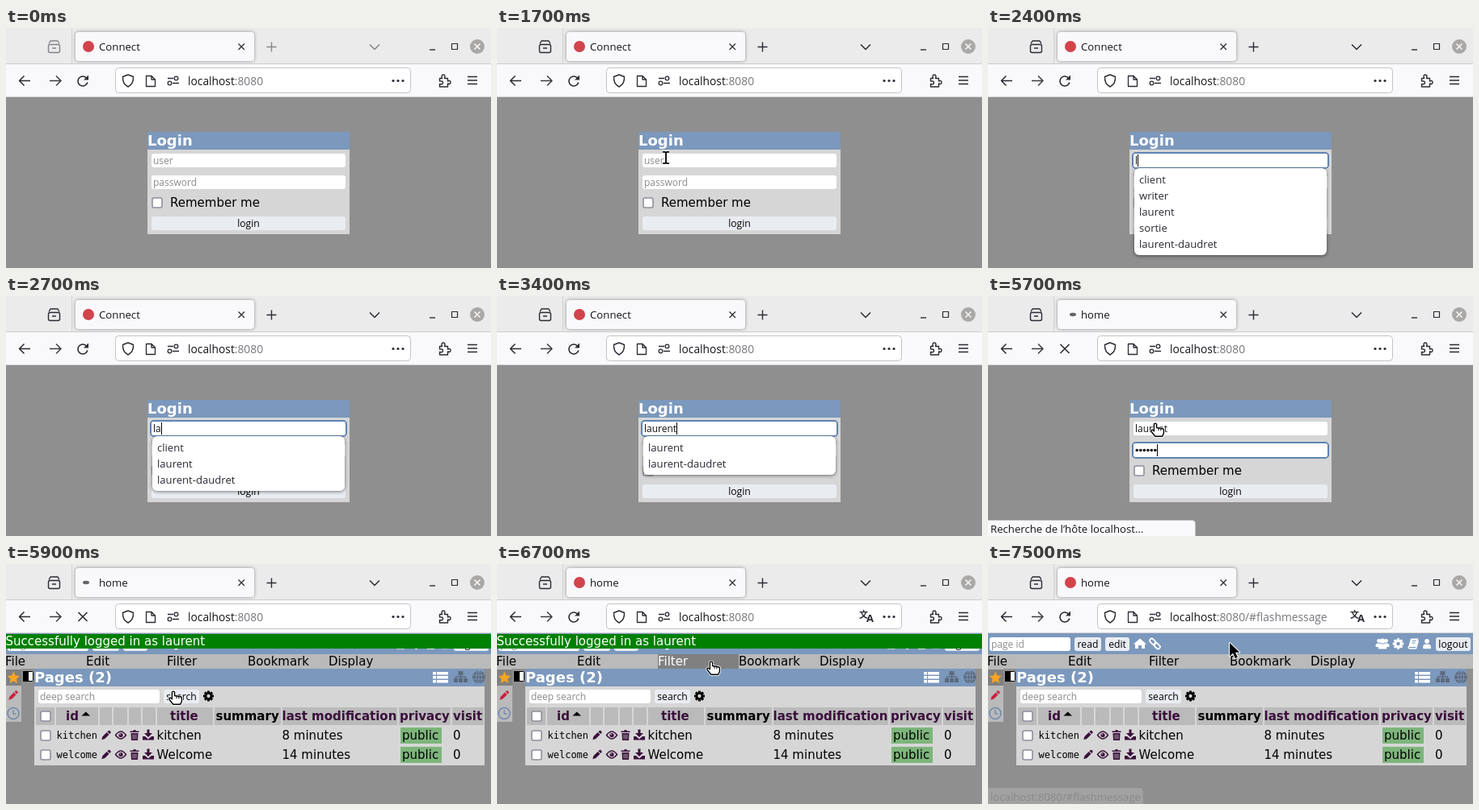
Animation, 600 px wide and 298 px high, one loop 8 s. Source, as an HTML page with a canvas:

```html
<!DOCTYPE html>
<html lang="en">
<head>
<meta charset="utf-8">
<title>Login demo</title>
<style>
html, body { margin: 0; width: 100%; height: 100%; overflow: hidden; }
canvas { display: block; width: 600px; height: 298px; }
</style>
</head>
<body>
<canvas id="stage" width="600" height="298"></canvas>
<script>
const g = document.getElementById('stage').getContext('2d');
const LOOP = 8000, STEP = 100, TAU = Math.PI * 2;
const UI = '"Open Sans", sans-serif', PAGE = '"DejaVu Sans", sans-serif', MONO = '"DejaVu Sans Mono", monospace';
const INK = '#2b2a33', GREY = '#8f8f8f', PANEL = '#d6d6d6', BAR = '#bababa', BLUE = '#7b98bd',
  BUTTON = '#e9edf2', PLUM = '#3a0f3b', HINT = '#8b8b8b';
const USER = 'laurent';
const ACCOUNTS = ['client', 'writer', USER, 'sortie', USER + '-daudret'];

// [time, x, y, shape]; a shape of '' hides the pointer
const POINTER = [
  [0, 0, 0, ''], [600, 116, 14, 'arrow'], [700, 121, 22, 'arrow'], [800, 134, 47, 'arrow'],
  [900, 155, 84, 'arrow'], [1000, 178, 120, 'arrow'], [1100, 196, 148, 'arrow'],
  [1200, 206, 159, 'beam'], [1500, 209, 161, 'beam'], [2400, 0, 0, ''],
  [5600, 207, 158, 'hand'], [6500, 222, 150, 'arrow'], [6600, 248, 137, 'arrow'],
  [6700, 265, 121, 'hand'], [6800, 285, 100, 'hand'], [6900, 297, 68, 'beam'],
  [7000, 299, 84, 'arrow'], [7100, 299, 98, 'hand'], [7300, 299, 98, 'arrow']
];
const USER_KEYS = [2400, 2600, 2900, 3000, 3100, 3200, 3400];
const DOT_KEYS = [4500, 4700, 4800, 4900, 5100, 5100];

const countUntil = (times, t) => times.filter(k => k <= t).length;

function rect(x, y, w, h, fill) { g.fillStyle = fill; g.fillRect(x, y, w, h); }

function box(x, y, w, h, r, fill, stroke, width = 1) {
  g.beginPath();
  g.roundRect(x, y, w, h, r);
  if (fill) { g.fillStyle = fill; g.fill(); }
  if (stroke) { g.strokeStyle = stroke; g.lineWidth = width; g.stroke(); }
}

function text(s, x, y, size, color = '#000', family = PAGE, weight = '', align = 'left') {
  g.font = `${weight} ${size}px ${family}`;
  g.textAlign = align;
  g.fillStyle = color;
  g.fillText(s, x, y);
  return g.measureText(s).width;
}

function disc(x, y, r, fill) {
  g.beginPath(); g.arc(x, y, r, 0, TAU);
  g.fillStyle = fill; g.fill();
}

function ring(x, y, r, color, width = 1.3, from = 0, to = TAU) {
  g.beginPath(); g.arc(x, y, r, from, to);
  g.strokeStyle = color; g.lineWidth = width; g.stroke();
}

function stroke(d, color = INK, width = 1.4) {
  g.strokeStyle = color; g.lineWidth = width;
  g.stroke(new Path2D(d));
}

function fill(d, color) { g.fillStyle = color; g.fill(new Path2D(d)); }

function at(x, y, draw, angle = 0) {
  g.save(); g.translate(x, y); g.rotate(angle); draw(); g.restore();
}

// Icons, each centred on x, y
function pencil(x, y, color) {
  at(x, y, () => fill('M-4.5-2H3V2H-4.5L-8 0ZM4-2H5.5Q7-2 7 0T5.5 2H4Z', color), -Math.PI / 4);
}

function eye(x, y) {
  at(x, y, () => {
    stroke('M-6.5 0Q-3-4.5 0-4.5T6.5 0Q3 4.5 0 4.5T-6.5 0Z', PLUM, 1.5);
    disc(0, 0, 2.6, PLUM);
    disc(-.8, -.8, .8, PANEL);
  });
}

function trash(x, y) {
  at(x, y, () => {
    fill('M-5.5-5H-2L-1-6.5H1L2-5H5.5V-3.5H-5.5ZM-4.5-2.5H4.5L4 6.5H-4Z', PLUM);
    stroke('M-2-1V5M0-1V5M2-1V5', PANEL, .7);
  });
}

function download(x, y) {
  at(x, y, () => fill('M-1.5-6.5H1.5V-2H5L0 3-5-2H-1.5ZM-7 2H-4L0 5.5 4 2H7V6.5H-7Z', PLUM));
}

function gear(x, y, r, color, hole) {
  for (let i = 0; i < 8; i++) at(x, y, () => rect(-1.5, -r, 3, r, color), i * TAU / 8);
  disc(x, y, r * .76, color);
  disc(x, y, r * .33, hole);
}

function person(x, y, color, k = 1) {
  disc(x, y - 3.2 * k, 2.9 * k, color);
  box(x - 5 * k, y + .6 * k, 10 * k, 5.6 * k, [4 * k, 4 * k, 1, 1], color);
}

function star(x, y, r) {
  g.beginPath();
  for (let i = 0; i < 10; i++) {
    const a = i * TAU / 10 - TAU / 4, d = i % 2 ? r * .48 : r;
    g.lineTo(x + d * Math.cos(a), y + d * Math.sin(a));
  }
  g.fillStyle = '#f9a423'; g.fill();
}

function globe(x, y, color) {
  disc(x, y, 7.8, color);
  stroke(`M${x - 7} ${y - 2.5}h14M${x - 7} ${y + 2.5}h14M${x} ${y - 7}v14`, BLUE, .9);
  g.beginPath(); g.ellipse(x, y, 3.6, 7.5, 0, 0, TAU); g.stroke();
}

// Browser window
function chrome(t) {
  const active = t >= 1700, loading = t >= 5500 && t < 6000, home = t >= 5600;
  const strip = active ? INK : '#85848a';
  rect(0, 0, 600, 45, '#ebebeb');
  rect(81, 0, 1, 44, '#d2d2d2');
  g.save();
  g.shadowColor = 'rgba(0,0,0,.4)'; g.shadowBlur = 4;
  box(86, 5, 221, 36, 4, '#f9f9fb');
  g.restore();

  box(52.5, 20.5, 14, 10, 2, null, strip, 1.4);
  stroke('M53 19.5L55 16H64L66 19.5M57 25H62', strip);
  stroke('M322.5 23.5H334.5M328.5 17.5V29.5', strip);
  stroke('M450 20.5L456 26.5 462 20.5', strip, 1.5);

  if (loading) {
    const x = 105 - 6 * Math.sin((t - 5700) / 400 * Math.PI);
    g.beginPath(); g.ellipse(x, 23, 4, 2.2, 0, 0, TAU);
    g.fillStyle = '#66656c'; g.fill();
  } else disc(102, 23, 7, '#d2434c');
  text(home ? 'home' : 'Connect', 115, 28, 13.2, '#15141a', UI);
  stroke('M287.5 19.5L295 27M295 19.5L287.5 27', INK, 1.2);

  stroke('M524 27H531', INK);
  box(551.5, 19.5, 7, 7, 0, null, INK, 1.2);
  disc(583, 23, 9, '#aaa8a6');
  stroke('M579.5 19.5L586.5 26.5M586.5 19.5L579.5 26.5', '#fff', 1.4);

  rect(0, 44, 600, 42, '#f9f9fb');
  rect(0, 44, 600, 1, '#cccccf');
  rect(0, 85, 600, 1, '#d0d0d2');
  stroke('M30 65.5H17M22.5 59.5L16.5 65.5 22.5 71.5', INK, 1.5);
  stroke('M54 65.5H67M62 59.5L68 65.5 62 71.5', '#3c3b43', 1.5);
  if (loading) stroke('M89.5 60L100.5 71M100.5 60L89.5 71', INK, 1.6);
  else {
    ring(95, 66, 6, INK, 1.6, .25, TAU - .75);
    fill('M102 58.5V64.5H96Z', INK);
  }
  addressBar(t);
  stroke('M536.5 62.5H539.5Q538 58 541 58T542.5 62.5H546.5V66Q550 64.5 550 67.5T546.5 69V73H536.5V69.5Q540.5 70.5 540.5 68T536.5 66Z', INK, 1.4);
  stroke('M571 60.5H583M571 65H583M571 69.5H583', INK, 1.5);
}

function addressBar(t) {
  box(135.5, 49.5, 365, 31, 4, '#fff', '#c3c3c6');
  stroke('M151 58L157.5 60.5Q158 69.5 151 73 144 69.5 144.5 60.5Z', INK, 1.4);
  stroke('M173.5 59.5H180L184.5 64V72.5H173.5ZM180 59.5V64H184.5', INK, 1.3);
  stroke('M200 62.5H207M206 68.5H214', INK, 1.4);
  ring(210.5, 62.5, 2.3, INK);
  ring(202.5, 68.5, 2.3, INK);
  const w = text('localhost', 225, 70.5, 13.8, '#15141a', UI);
  text(':8080' + (t >= 7300 ? '/#flashmessage' : ''), 225 + w, 70.5, 13.8, '#77767c', UI);
  if (t >= 6100) {
    text('文', 448, 67, 11, INK, '"Noto Sans CJK SC", "Noto Sans CJK", sans-serif', 'bold');
    text('A', 457, 72, 13, INK, UI, 'bold');
  }
  for (let x = 479; x <= 491; x += 6) disc(x, 65.5, 1.6, INK);
}

// Page widgets
function field(x, y, w, hint, value = '') {
  box(x, y, w, 17, 3, '#fff');
  text(value || hint, x + 2, y + 13, 12, value ? '#111' : HINT, UI);
}

function focusRing(y) { box(179, y - 1, 242, 19, 4, '#fff', '#5f83b3', 2); }

function button(x, y, w, label) {
  box(x, y, w, 17, 3, BUTTON);
  text(label, x + w / 2, y + 13, 12.2, '#000', UI, '', 'center');
}

function checkbox(x, y) { box(x + 1, y + 1, 12, 12, 2, '#fff', '#8f8f9d', 1.6); }

function loginPage(t) {
  rect(175, 130, 250, 126, PANEL);
  rect(175, 129, 250, 22, BLUE);
  text('Login', 175, 146, 18, '#fff', PAGE, 'bold');

  const typed = USER.slice(0, countUntil(USER_KEYS, t)), dots = countUntil(DOT_KEYS, t);
  const inUser = t >= 1800 && t < 3700, inPass = t >= 3700;
  if (inUser) focusRing(156);
  field(180, 156, 240, 'user', typed);
  if (inPass) focusRing(183);
  field(180, 183, 240, dots ? '' : 'password');
  for (let i = 0; i < dots; i++) disc(184.3 + i * 4.5, 191.5, 1.8, '#111');

  if (inUser) {
    g.font = `12px ${UI}`;
    rect(Math.round(182 + g.measureText(typed).width), 157, 1, 15, '#000');
  }
  if (inPass) rect(Math.round(182 + dots * 4.5), 184, 1, 15, '#000');

  checkbox(180, 210);
  text('Remember me', 203, 222, 15);
  button(180, 234, 240, 'login');
  if (inUser) suggestions(t);
}

function suggestions(t) {
  const names = t < 2600 ? ACCOUNTS
    : t < 3000 ? [ACCOUNTS[0], ACCOUNTS[2], ACCOUNTS[4]]
    : [ACCOUNTS[2], ACCOUNTS[4]];
  g.save();
  g.shadowColor = 'rgba(0,0,0,.5)'; g.shadowBlur = 4; g.shadowOffsetY = 1;
  box(181, 174, 238, 8 + 20 * names.length, 6, '#fff');
  g.restore();
  names.forEach((n, i) => text(n, 187, 193 + 20 * i, 13.1, INK, UI));
}

function topBar() {
  rect(0, 86, 600, 26, BLUE);
  field(2, 91, 100, 'page id');
  button(107, 91, 33, 'read');
  button(145, 91, 30, 'edit');
  fill('M188 92.5L196 99.5H194V105H190V101H186V105H182V99.5H180Z', '#fff');
  at(206.5, 99, () => {
    box(-8, -2.5, 8.5, 5, 2.5, null, '#fff', 1.8);
    box(-.5, -2.5, 8.5, 5, 2.5, null, '#fff', 1.8);
  }, Math.PI / 4);
  person(483.5, 98, '#fff', .8);
  person(492.5, 98, '#fff', .8);
  person(488, 99, '#fff', 1.05);
  gear(507.5, 99, 6.8, '#fff', BLUE);
  at(526, 99, () => {
    fill('M-3-6.5H6.5L3.5 4H-6Z', '#fff');
    stroke('M-6 3.5Q-6 6 -4 6H3.5L6.5-4', '#fff', 1.3);
    stroke('M-1-3.5H3.5M-1.8-1H2.7', BLUE, 1);
  });
  person(543, 99, '#fff');
  button(554, 91, 43, 'logout');
}

function menu(p) {
  rect(0, 112, 600, 18, BAR);
  ['File', 'Edit', 'Filter', 'Bookmark', 'Display'].forEach((label, i) => {
    const x = i ? i * 100 - 1 : -1;
    const hover = p.shape && p.y >= 112 && p.y < 130 && p.x >= x && p.x < x + 100;
    if (hover) rect(x, 112, 100, 18, '#808080');
    text(label, x, 126, 15, hover ? '#fff' : '#000');
  });
}

function sidebar() {
  rect(0, 130, 19, 66, BAR);
  rect(0, 131, 19, 20, '#808080');
  star(9.3, 141.5, 8);
  box(21.5, 133.5, 12, 12, 1, '#fff', '#000');
  rect(21, 133, 7, 13, '#000');
  pencil(9, 163, '#c9203c');
  ring(9, 185.5, 7, '#7089ae', 1.6);
  stroke('M9 181V186H12.5', '#7089ae', 1.4);
}

function pageList() {
  rect(35, 130, 557, 120, PANEL);
  rect(35, 130, 557, 22, BLUE);
  text('Pages (2)', 35, 147, 18, '#fff', PAGE, 'bold');
  for (let y = 134; y < 147; y += 5) {
    rect(528, y, 4, 3.5, '#fff');
    rect(533, y, 14, 3.5, '#fff');
  }
  const dim = '#5d6a7c';
  for (const x of [554, 560, 566]) rect(x, 142, 5, 5, dim);
  rect(559.5, 133, 6, 5, dim);
  stroke('M562.5 138V142M556.5 142V140H568.5V142', dim, 1.3);
  globe(585, 140.5, dim);

  field(40, 156, 150, 'deep search');
  button(195, 156, 44, 'search');
  gear(250.5, 164, 6.5, '#000', PANEL);

  const edges = [37, 62, 116, 133, 152, 169, 187, 258, 342, 486, 552, 593];
  for (let i = 0; i < edges.length - 1; i++) {
    rect(edges[i], 178, Math.min(edges[i + 1] - 2, 591) - edges[i], 22, BAR);
  }
  checkbox(42, 182);
  const head = (s, x, color = PLUM) => text(s, x, 194, 15, color, PAGE, 'bold');
  head('id', 74);
  fill('M93.5 188.5L98.8 183.5 104 188.5Z', '#000');
  head('title', 203);
  head('summary', 259.5, '#000');
  head('last modification', 341.5);
  head('privacy', 487);
  head('visit', 553);
  row(212.5, 'kitchen', 'kitchen', '8 minutes');
  row(236.5, 'welcome', 'Welcome', '14 minutes');
}

function row(y, id, title, age) {
  checkbox(42, y - 6.5);
  text(id, 62.5, y + 4.5, 12, '#000', MONO);
  pencil(124, y, PLUM);
  eye(142, y);
  trash(159, y);
  download(176, y - .5);
  text(title, 186.5, y + 5, 15);
  text(age, 341.5, y + 5, 15);
  rect(488, y - 9.5, 51, 20, '#7db57b');
  text('public', 490, y + 5, 15);
  text('0', 553, y + 5, 15);
}

function homePage(t, p) {
  topBar();
  menu(p);
  sidebar();
  pageList();
  if (t < 7300) {
    rect(0, 87, 600, 18, '#008000');
    text('Successfully logged in as ' + USER, -.5, 101, 15, '#fff');
  }
}

function status(label, w, alpha = 1) {
  g.save();
  g.globalAlpha = alpha;
  box(-1.5, 278.5, w + 1, 22, [0, 4, 0, 0], '#f9f9fb', '#c0c0c3');
  text(label, 3, 294, 13.2, '#15141a', UI);
  g.restore();
}

function statusBar(t, p) {
  const link = 'localhost:8080/#flashmessage';
  if (t >= 5600 && t < 5900) status('Recherche de l’hôte localhost…', 257);
  else if (t >= 7300) status(link, 192, t < 7400 ? .75 : t < 7500 ? .45 : .18);
  else if (t >= 6500 && p.y >= 87 && p.y < 105) status(link, 192);
}

const CURSORS = {
  arrow() {
    const d = 'M0 0V16.5L4 12.8 6.8 19 9.8 17.7 7 11.8H12.3Z';
    stroke(d, '#fff', 2);
    fill(d, '#000');
  },
  beam() {
    const d = 'M-4-7.2H-1.5L0-6 1.5-7.2H4M0-6.5V6.5M-4 7.2H-1.5L0 6 1.5 7.2H4';
    stroke(d, '#fff', 3.6);
    stroke(d, '#000', 1.8);
  },
  hand() {
    const d = 'M-1.6 1.2Q0-.9 1.6 1.2V5.5L9 6.8Q10.6 7.2 10.4 9V12.5L8.7 16.3H-.2L-5 10.2Q-5.4 7.8-3.4 8.3L-1.6 9.8Z';
    stroke(d, '#fff', 3);
    fill(d, '#fff');
    stroke(d, '#000', 1.4);
    stroke('M4 6.5V9M6.8 7V9.3', '#000', 1);
  }
};

function draw(now) {
  const t = Math.floor(now % LOOP / STEP) * STEP;
  const [, x, y, shape] = POINTER.findLast(k => k[0] <= t);
  const p = { x, y, shape };
  g.lineJoin = 'round';
  rect(0, 0, 600, 298, GREY);
  if (t < 5800) loginPage(t); else homePage(t, p);
  chrome(t);
  statusBar(t, p);
  if (shape) at(x, y, CURSORS[shape]);
}

const start = performance.now();
function tick() {
  draw(performance.now() - start);
  requestAnimationFrame(tick);
}
tick();
</script>
</body>
</html>
```
